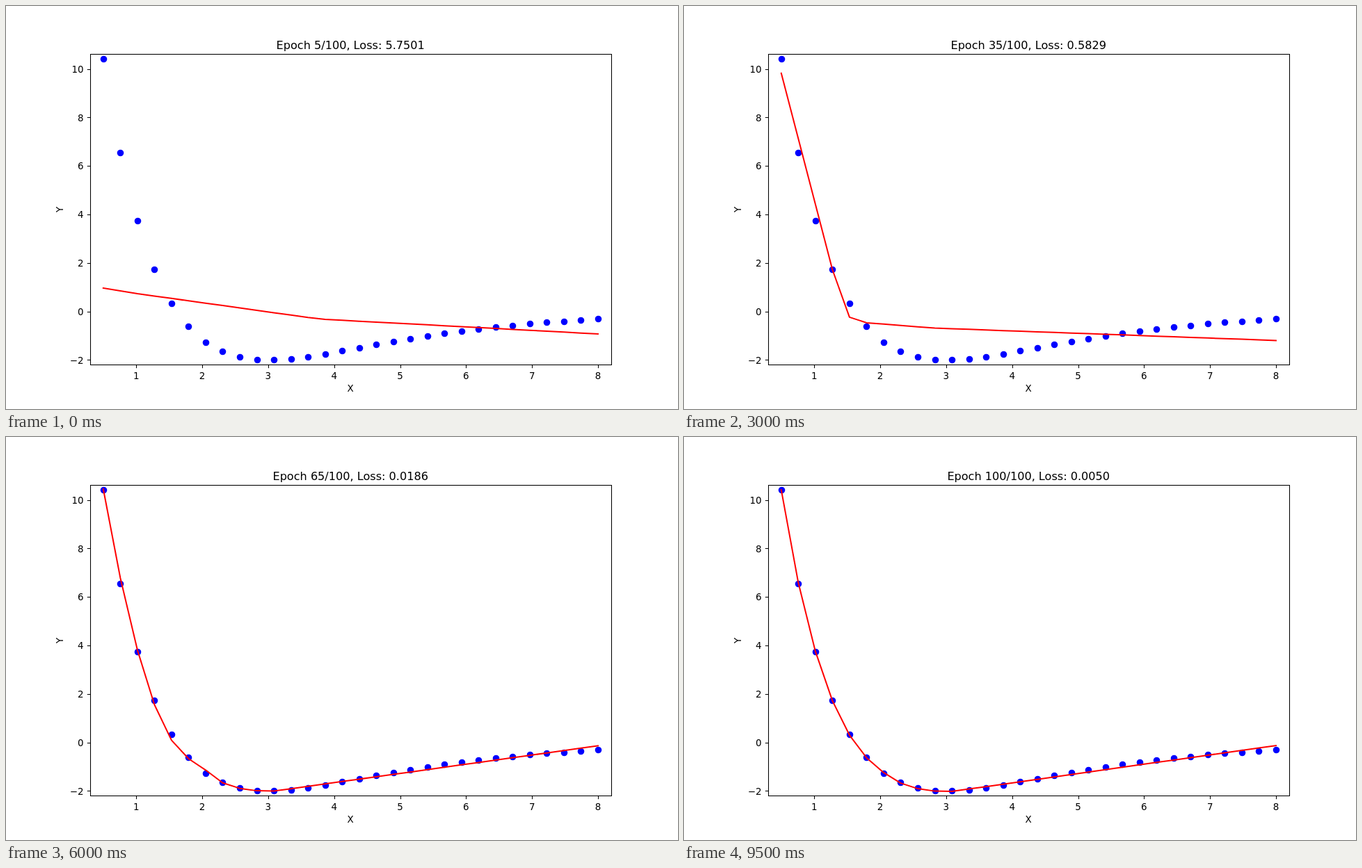
Write an HTML page that moves like this. It is 966 px wide and 580 px high and loops after 10000 ms.

```html
<!DOCTYPE html>
<html lang="en">
<head>
<meta charset="utf-8">
<title>Curve fit by epoch</title>
<style>
  html, body { margin: 0; width: 100%; height: 100%; overflow: hidden; background: #fff; }
  svg { display: block; width: 966px; height: 580px; }
  text { font: 13.42px "DejaVu Sans", sans-serif; fill: #000; text-anchor: middle; }
  #title { font-size: 16.1px; }
  .end { text-anchor: end; }
  .axis { fill: none; stroke: #000; stroke-width: 1.07; }
  #dots { fill: #00f; }
  #fit { fill: none; stroke: #f00; stroke-width: 2.01; stroke-linecap: square; stroke-linejoin: round; }
</style>
</head>
<body>
<svg viewBox="0 0 966 580">
  <clipPath id="clip"><rect x="121" y="69" width="750" height="448"/></clipPath>
  <g id="dots"></g>
  <polyline id="fit" clip-path="url(#clip)"/>
  <rect class="axis" x="121.5" y="69.5" width="749" height="447"/>
  <g id="ticks"></g>
  <text id="title" x="495.2" y="62"></text>
  <text x="495.2" y="555">X</text>
  <text transform="translate(82 293) rotate(-90)">Y</text>
</svg>
<script>
const STEP = 500, COUNT = 20, LAST = 29, TROUGH = 10;
const $ = id => document.getElementById(id);
const mix = (a, b, k) => a + (b - a) * k;

function add(parent, tag, attrs, text) {
  const el = document.createElementNS("http://www.w3.org/2000/svg", tag);
  for (const k in attrs) el.setAttribute(k, attrs[k]);
  if (text !== undefined) el.textContent = text;
  parent.appendChild(el);
}

const px = x => 120.85 + (x - 0.3) * 94.82;
const py = y => 439.5 - y * 34.9;
const snap = v => Math.round(v) + 0.5;
const sampleX = i => 0.5 + 7.5 * i / LAST;

// Morse potential: depth 2, width 0.5, minimum at 3
function morse(x) {
  const u = Math.exp(-0.5 * (x - 3));
  return 2 * (u * u - 2 * u);
}

// Early fits: the bends of the line as [sample, value] per epoch
const bends = [
  [5, [[0, .96], [2, .73], [12, -.25], [13, -.33], [LAST, -.93]]],
  [15, [[0, 3.9], [6, -.15], [7, -.45], [LAST, -1.92]]],
  [25, [[0, 7.56], [4, .8], [5, -.23], [8, -.48], [LAST, -1.75]]],
  [35, [[0, 9.82], [3, 1.72], [4, -.24], [5, -.47], [9, -.69], [LAST, -1.2]]],
  [45, [[0, 10.55], [2, 3.95], [3, 1.19], [4, -.39], [5, -.76], [6, -.9], [9, -1.06], [LAST, -.88]]]
];

const losses = [
  [5, 5.7501], [25, 1.1659], [35, .5829], [45, .3244], [65, .0186], [85, .0107], [100, .005]
];

// Values on both sides of t and how far t lies between them
function around(keys, t) {
  const n = Math.max(1, keys.findIndex(key => key[0] >= t));
  const [t0, a] = keys[n - 1], [t1, b] = keys[n];
  return [a, b, (t - t0) / (t1 - t0)];
}

const along = (keys, t) => mix(...around(keys, t));

function lossAt(epoch) {
  const [a, b, k] = around(losses, epoch);
  return a * Math.pow(b / a, k);
}

function earlyFit(epoch, i) {
  const [a, b, k] = around(bends, epoch);
  return mix(along(a, i), along(b, i), k);
}

// Follows the data down to the trough, then runs straight
function finalFit(i) {
  if (i <= TROUGH) return morse(sampleX(i));
  return mix(morse(sampleX(TROUGH)), -0.15, (i - TROUGH) / (LAST - TROUGH));
}

function fitAt(epoch, i) {
  if (epoch <= 45) return earlyFit(epoch, i);
  const t = (epoch - 45) / 5;
  // the steep part settles slowly, the rest overshoots and swings back
  const k = i <= 6 ? 1 - Math.exp(-0.27 * t) : 1 - Math.exp(-0.22 * t) * Math.cos(0.4 * t);
  return mix(earlyFit(45, i), finalFit(i), k);
}

const samples = Array.from({ length: LAST + 1 }, (_, i) => i);

for (const i of samples) {
  const x = sampleX(i);
  add($("dots"), "circle", { cx: snap(px(x)), cy: snap(py(morse(x))), r: 4.8 });
}

for (let x = 1; x <= 8; x++) {
  add($("ticks"), "path", { class: "axis", d: `M${snap(px(x))} 516.5v4.7` });
  add($("ticks"), "text", { x: px(x), y: 537 }, x);
}
for (let y = -2; y <= 10; y += 2) {
  add($("ticks"), "path", { class: "axis", d: `M121.5 ${snap(py(y))}h-4.7` });
  add($("ticks"), "text", { class: "end", x: 111.5, y: Math.round(py(y) + 5.2) }, String(y).replace("-", "\u2212"));
}

let shown = -1;
function show(n) {
  if (n === shown) return;
  shown = n;
  const epoch = 5 * (n + 1);
  const pts = samples.map(i => px(sampleX(i)).toFixed(2) + "," + py(fitAt(epoch, i)).toFixed(2));
  $("fit").setAttribute("points", pts.join(" "));
  $("title").textContent = `Epoch ${epoch}/100, Loss: ${lossAt(epoch).toFixed(4)}`;
}

const start = performance.now();
function tick() {
  show(Math.floor((performance.now() - start) / STEP) % COUNT);
  requestAnimationFrame(tick);
}
tick();
</script>
</body>
</html>
```
